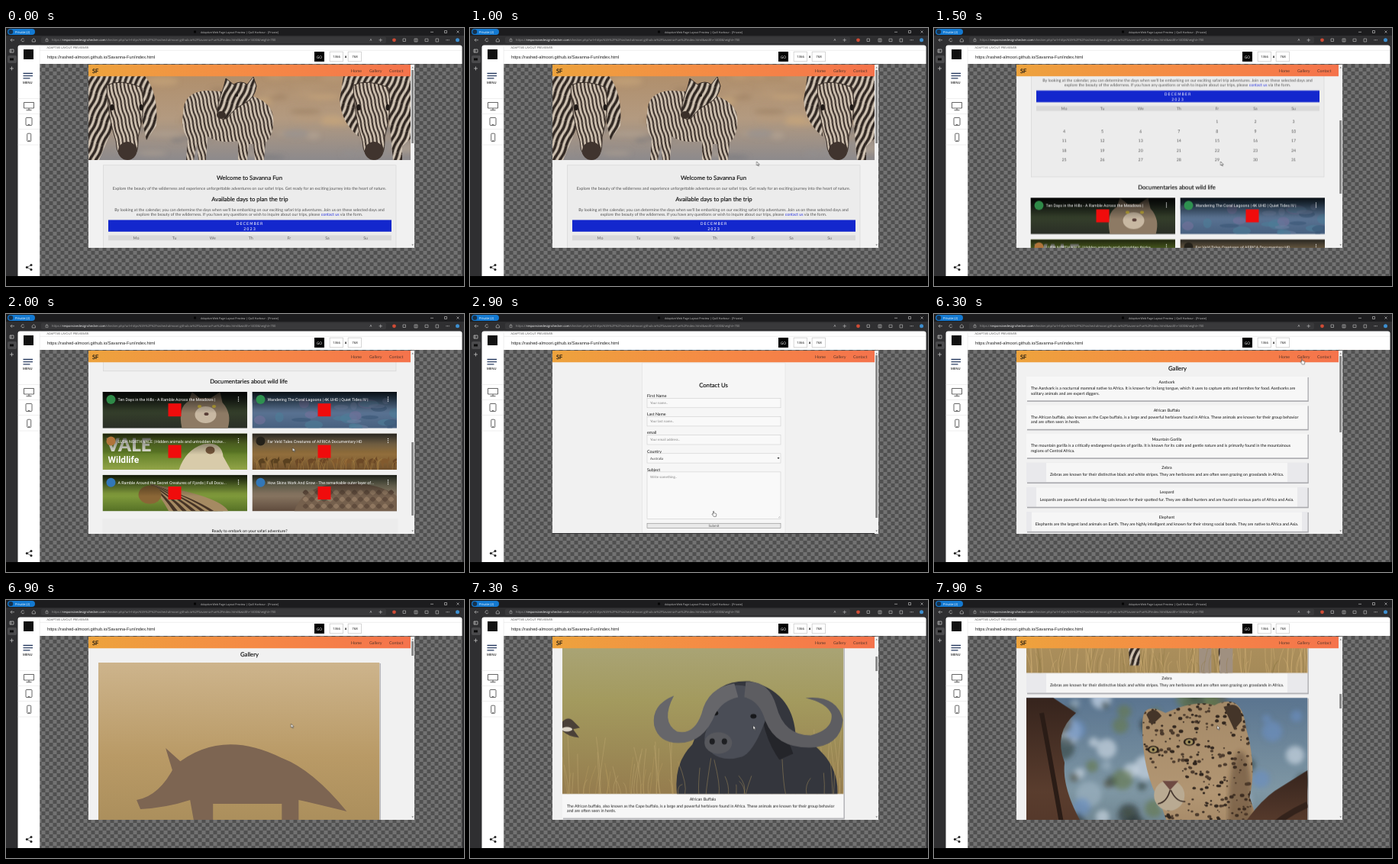
Recreate the animation shown at these times as an HTML page. Size 600 px wide and 338 px high, loop 8000 ms.

```html
<!DOCTYPE html>
<html lang="en">
<head>
<meta charset="utf-8">
<title>Site walkthrough</title>
<style>
html, body { margin: 0; width: 100%; height: 100%; overflow: hidden; background: #000; }
#stage { display: block; width: 100vw; height: 100vh; }
text { font: 5.3px Lato, "Open Sans", sans-serif; fill: #111; text-rendering: geometricPrecision; white-space: pre; }
.ui { font-family: "Open Sans", "Noto Sans", sans-serif; }
.mid { text-anchor: middle; }
.head { font-size: 7.75px; stroke: #111; stroke-width: .15px; }
.soft { fill: #505050; }
.link { fill: #54362b; }
.hint { font-size: 4.5px; fill: #858585; }
.clip { font: 5.3px Roboto, sans-serif; fill: #fff; }
.cal { font: 5px "DejaVu Sans", sans-serif; fill: #fff; letter-spacing: .95px; }
.thumb { fill: #858585; }

.home, .contact, .gallery, .bare, .full, .mouse, .arrow, .hand { animation: 8s step-end infinite; }
.home { animation-name: home; }
.contact { animation-name: contact; }
.gallery { animation-name: gallery; }
.bare { animation-name: bare; }
.full { animation-name: full; }
.mouse { animation-name: enter; }
.arrow { animation-name: arrow; }
.hand { animation-name: hand; }
@keyframes home { 0% { opacity: 1 } 35%, 100% { opacity: 0 } }
@keyframes contact { 0% { opacity: 0 } 35% { opacity: 1 } 69.4%, 100% { opacity: 0 } }
@keyframes gallery { 0% { opacity: 0 } 69.4%, 100% { opacity: 1 } }
@keyframes bare { 0% { opacity: 1 } 82%, 100% { opacity: 0 } }
@keyframes full { 0% { opacity: 0 } 82%, 100% { opacity: 1 } }
@keyframes enter { 0% { opacity: 0 } 5%, 100% { opacity: 1 } }
@keyframes arrow { 0% { opacity: 1 } 32% { opacity: 0 } 36.5% { opacity: 1 } 49% { opacity: 0 } 54% { opacity: 1 } 65% { opacity: 0 } 81%, 100% { opacity: 1 } }
@keyframes hand { 0% { opacity: 0 } 32% { opacity: 1 } 36.5% { opacity: 0 } 49% { opacity: 1 } 54% { opacity: 0 } 65% { opacity: 1 } 81%, 100% { opacity: 0 } }

.homeRoll { animation: homeRoll 8s linear infinite; }
.homeThumb { animation: homeThumb 8s linear infinite; }
.formRoll { animation: formRoll 8s linear infinite; }
.formThumb { animation: formThumb 8s linear infinite; }
.pics { animation: pics 8s linear infinite; }
.picsThumb { animation: picsThumb 8s linear infinite; }
.path { animation: path 8s ease-in-out infinite; }
@keyframes homeRoll { 0%, 13.5% { transform: translateY(0) } 22.5%, 27.5% { transform: translateY(-290px) } 31.2%, 100% { transform: translateY(-332px) } }
@keyframes homeThumb { 0%, 13.5% { transform: translateY(0) } 22.5%, 27.5% { transform: translateY(113px) } 31.2%, 100% { transform: translateY(129px) } }
@keyframes formRoll { 0%, 42% { transform: translateY(0) } 45%, 100% { transform: translateY(-13px) } }
@keyframes formThumb { 0%, 42% { transform: translateY(0) } 45%, 100% { transform: translateY(13px) } }
@keyframes pics { 0%, 87.6% { transform: translateY(0) } 91.25% { transform: translateY(-354px) } 98.75% { transform: translateY(-1077.5px) } 100% { transform: translateY(-1198px) } }
@keyframes picsThumb { 0%, 87.6% { transform: translateY(0) } 91.25% { transform: translateY(20px) } 98.75% { transform: translateY(69px) } 100% { transform: translateY(77px) } }
@keyframes path {
  0%, 5% { transform: translate(450px, 282px) }
  11%, 28% { transform: translate(375.5px, 175px) }
  32%, 36.5% { transform: translate(319px, 258px) }
  43% { transform: translate(345px, 215px) }
  50%, 53.5% { transform: translate(323px, 253px) }
  57.5% { transform: translate(388px, 176px) }
  66%, 80% { transform: translate(482px, 58.5px) }
  87%, 100% { transform: translate(371px, 164.5px) }
}
</style>
</head>
<body>
<svg id="stage" viewBox="0 0 600 338">
  <defs id="defs">
    <pattern id="checks" x="46.5" y="47" width="10" height="10" patternUnits="userSpaceOnUse">
      <path fill="#727272" d="M0 0h10v10H0z"/><path fill="#505050" d="M0 0h5v5H0zM5 5h5v5H5z"/>
    </pattern>
    <pattern id="stripes" width="7" height="30" patternUnits="userSpaceOnUse" patternTransform="rotate(24)">
      <path fill="#cfc2b2" d="M0 0h7v30H0z"/><path d="M3 0Q5 8 3.5 15T3 30" fill="none" stroke="#302722" stroke-width="3.6"/>
    </pattern>
    <pattern id="stripes2" width="5" height="24" patternUnits="userSpaceOnUse" patternTransform="rotate(-14)">
      <path fill="#d3c5b4" d="M0 0h5v24H0z"/><path d="M2 0Q3.5 6 2.5 12T2 24" fill="none" stroke="#3a2f29" stroke-width="2.2"/>
    </pattern>
    <clipPath id="view"><path d="M108 48h422v240H108z"/></clipPath>
    <clipPath id="banner"><path d="M108 63h422v110H108z"/></clipPath>
    <filter id="blur"><feGaussianBlur stdDeviation="3"/></filter>
  </defs>

  <!-- browser -->
  <path fill="#1c1c1e" d="M0 0h600v10H0z"/>
  <path fill="#2f2f31" d="M0 10h600v13H0zM0 22h18v303H0z"/>
  <rect x="2" y="1" width="36" height="8" rx="4" fill="#1379d1"/>
  <circle cx="6.3" cy="5" r="3" fill="#17324c"/>
  <text class="ui" x="12" y="6.6" style="font-size:4.1px;fill:#fff">Private (2)</text>
  <path fill="#050505" d="M246 3.5h3v3h-3z"/>
  <text class="ui mid" x="306" y="6.7" style="font-size:3.6px;fill:#c9c9c9">Adaptive Web Page Layout Preview | Quill Harbour - [Private]</text>
  <path d="M556 5.3h4M574.5 3.5h3v3h-3zM590.5 3.5l3 3m0-3l-3 3M11 15.8H6m2-2l-2 2 2 2M23.6 14.6a2 2 0 1 0 .3 1.8M34.2 18v-2.4l2.1-1.9 2.1 1.9V18z" fill="none" stroke="#d0d0d0" stroke-width=".6"/>
  <rect x="46" y="11.5" width="452" height="8.6" rx="2" fill="#39393b"/>
  <path d="M52 15h3v2.6h-3zM52.7 15v-1q.8-1 1.6 0v1" fill="none" stroke="#bbb" stroke-width=".5"/>
  <text class="ui" x="60" y="17.3" style="font-size:4.05px;fill:#a5a5a5">https://<tspan fill="#fff">responsivedesignchecker.com</tspan>/checker.php?url=https%3A%2F%2Frashed-almoori.github.io%2FSavanna-Fun%2Findex.html&amp;width=1400&amp;height=700</text>
  <text class="ui" x="476.5" y="17.4" style="font-size:4.4px;fill:#ccc">A</text>
  <g fill="none" stroke="#c4c4c4" stroke-width=".6">
    <path d="M488.5 15.8h4.4m-2.2-2.2v4.4M520 14h3.5v3.5H520zM535 14h4v4h-4zm2 0v4M549 14.2h4v3.4h-4zM563 14h3.6v4H563z"/>
  </g>
  <circle cx="508.5" cy="15.8" r="2.4" fill="#cf4b35"/>
  <path d="M576.5 15.8h4.2" stroke="#ccc" stroke-width=".9" stroke-dasharray=".9 .75"/>
  <circle cx="591.5" cy="15.8" r="2.5" fill="#3d8fd0"/>
  <rect x="2" y="36" width="12" height="10" rx="2" fill="#4a4a4c"/>
  <path d="M5 28h5v4H5zm1.7 0v4M7.5 50.5v5M5 53h5" fill="none" stroke="#ccc" stroke-width=".7"/>
  <path fill="#0c0c0c" d="M5 39.5h5v3H5z"/>

  <!-- checker site -->
  <path fill="#2f2f31" d="M590 22h10v303h-10z"/>
  <path fill="#fff" d="M15.5 25.4q0-3 3-3h576q3 0 3 3V47H44v278H15.5z"/>
  <path fill="url(#checks)" d="M44 47h553.5v278H44z"/>
  <path d="M44.2 22.5V325M15.5 92.5H44M15.5 112.5H44M15.5 132.5H44M15.5 153H44M44 29.3h553" stroke="#dfdfdf" stroke-width=".5"/>
  <path fill="#111" d="M23 28h13v13H23z"/>
  <path d="M22.5 59.5h12.5M22.5 62.7h12.5M22.5 65.9h9" stroke="#2c3f63" stroke-width="1.3"/>
  <text class="ui mid" x="28.3" y="73" style="font-size:4.2px;font-weight:600;fill:#222">MENU</text>
  <g fill="none" stroke="#333" stroke-width=".75">
    <path d="M23.5 97.5h13v7.5h-13zM30 105v2.5M26.5 107.6h7"/>
    <rect x="26" y="117.5" width="8" height="10" rx="1"/><rect x="27.7" y="138.2" width="5" height="10.4" rx="1"/>
    <path d="M33 310.5l-5.5 3 5.5 3"/>
    <path d="M29 126.4h2M29.3 147.4h2"/>
  </g>
  <g fill="#222"><circle cx="33" cy="310.4" r="1.5"/><circle cx="27.3" cy="313.5" r="1.5"/><circle cx="33" cy="316.6" r="1.5"/></g>
  <text class="ui" x="53.5" y="27.1" style="font-size:3.9px;fill:#555">ADAPTIVE LAYOUT PREVIEWER</text>
  <text x="54" y="39.6" style="font-family:'Liberation Sans',Arial,sans-serif;font-size:5.7px;fill:#222">https://rashed-almoori.github.io/Savanna-Fun/index.html</text>
  <path fill="#000" d="M404 31h13v13h-13z"/>
  <text class="ui mid" x="410.5" y="39.5" style="font-size:5px;fill:#fff">GO</text>
  <path d="M424.2 31.2h17.3v12.6h-17.3zM448.2 31.2h17.3v12.6h-17.3z" fill="#fff" stroke="#aaa" stroke-width=".5"/>
  <g class="mid"><text class="ui" x="433" y="39.2" style="font-size:4.3px">1366</text><text class="ui" x="445" y="39.2" style="font-size:4.6px;font-weight:700">x</text><text class="ui" x="457" y="39.2" style="font-size:4.3px">768</text></g>

  <!-- previewed pages -->
  <path fill="#f1f1f1" d="M108 48h427v240H108z"/>
  <g class="home">
    <g clip-path="url(#view)"><g class="homeRoll" id="homePage"></g></g>
    <rect class="thumb homeThumb" x="531.2" y="55" width="2.8" height="96"/>
  </g>
  <g class="contact">
    <g clip-path="url(#view)"><g class="formRoll" id="formPage"></g></g>
    <rect class="thumb formThumb" x="531.2" y="54" width="2.8" height="213"/>
  </g>
  <g class="gallery">
    <g class="bare">
      <g clip-path="url(#view)" id="bareCards"></g>
      <rect class="thumb" x="531.2" y="55" width="2.8" height="100"/>
    </g>
    <g class="full">
      <g clip-path="url(#view)"><g class="pics" id="fullCards"></g></g>
      <rect class="thumb picsThumb" x="531.2" y="54" width="2.8" height="19"/>
    </g>
  </g>
  <path d="M531.4 52.5l1.3-1.6 1.3 1.6zM531.4 283.5l1.3 1.6 1.3-1.6z" fill="#666"/>
  <path fill="url(#nav)" d="M108 48h422v15.3H108z"/>
  <text x="113" y="58.6" style="font-size:7.5px;stroke:#111;stroke-width:.15px">SF</text>
  <text class="link" x="452" y="57.6">Home</text><text class="link" x="476" y="57.6">Gallery</text><text class="link" x="502" y="57.6">Contact</text>

  <g class="mouse"><g class="path" fill="#fff" stroke="#222" stroke-width=".5">
    <path class="arrow" d="M0 0v5l1.2-1 .9 1.9 .9-.4-.9-1.8h1.6z"/>
    <path class="hand" d="M-.5.6q.6-.9 1.1 0v2.2l2.6.6q.8.3.6 1.4l-.5 2.5H.2L-1.9 4.4q0-.9.9-.5l.5.5z"/>
  </g></g>
</svg>
<script>
const $ = id => document.getElementById(id);
const text = (x, y, str, cls = '', style = '') => `<text x="${x}" y="${y}" class="${cls}" style="${style}">${str}</text>`;
const box = (x, y, w, h, fill, more = '') => `<rect x="${x}" y="${y}" width="${w}" height="${h}" fill="${fill}" ${more}/>`;
const shape = (d, fill, more = '') => `<path d="${d}" fill="${fill}" ${more}/>`;
const oval = (x, y, rx, ry, fill, more = '') => `<ellipse cx="${x}" cy="${y}" rx="${rx}" ry="${ry}" fill="${fill}" ${more}/>`;
const range = n => [...Array(n).keys()];
let seed = 7;
const rnd = (a = 0, b = 1) => a + (b - a) * (seed = seed * 16807 % 2147483647) / 2147483647;
const pick = list => list[Math.floor(rnd(0, list.length))];

const grads = {
  nav: ['#eda33d', '#f58a45', '#f5734c'], shade: ['#000c', '#0005', '#0000'],
  plain: ['#b08f6c', '#b39a80', '#8d8a8c'], forest: ['#151a17', '#35402b', '#2a2e26'],
  sea: ['#31506b', '#5c7595', '#47607f'], leaf: ['#87a23a', '#5f7d27', '#93a548'],
  veld: ['#b7a88c', '#98743f', '#6f4f2b'], moss: ['#5d7a2c', '#86a13e', '#557026'],
  rock: ['#8e9a78', '#8d7b66', '#5e4a3c'], olive: ['#aeab86', '#a39a5e', '#957c4e'],
  sand: ['#cdb48c', '#b99a66', '#a58a58'], sky: ['#5a748f', '#7f97a4', '#4f626a'],
  jungle: ['#5f7a44', '#46602f', '#33451f'], coat: ['#a58a68', '#b29673', '#927454'],
  bark: ['#36241d', '#5a3d2e', '#4a2f24'],
};
$('defs').innerHTML += Object.entries(grads).map(([id, colors]) =>
  `<linearGradient id="${id}" ${id === 'nav' ? '' : 'x2="0" y2="1"'}>` +
  colors.map((c, i) => `<stop offset="${i / 2}" stop-color="${c}"/>`).join('') + '</linearGradient>').join('');

const footer = y => box(108, y, 422, 15, '#2d2d2f') +
  [305, 319.5, 333.5].map(x => oval(x, y + 7.2, 3.6, 3.6, '#5a70e0')).join('');

// home
const grazing = shape('M132 75Q150 66 178 78Q183 110 173 143Q174 172 160 172Q145 172 144 148Q133 115 132 75Z', 'url(#stripes2)', 'stroke="#3a2f29"') +
  oval(159, 161, 12, 12, '#40342e') + oval(139, 104, 2.5, 4, '#1f1916') + oval(177, 104, 2.5, 4, '#1f1916');
const haze = range(50).map(() => {
  const y = rnd(63, 173);
  return oval(rnd(108, 530), y, rnd(8, 24), rnd(2, 6), pick(y < 125 ? ['#c8a67c', '#9c7f60', '#b79a78'] : ['#77777c', '#b5a594', '#93908f']), 'opacity=".6"');
}).join('');
const hero = `<g clip-path="url(#banner)">` + box(108, 63, 422, 110, 'url(#plain)') + `<g filter="url(#blur)">${haze}</g>` +
  shape('M108 63H182Q200 85 197 128L184 147L178 120 140 130 122 173H108Z', 'url(#stripes)') + grazing +
  shape('M232 112Q232 84 262 82L300 84Q345 90 350 115Q352 140 340 150L338 173H326L324 152H318L316 173H304V148Q280 152 264 142L262 173H252L250 150 246 173H236L238 145Q228 130 232 112Z', 'url(#stripes2)') +
  shape('M285 78L288 66 298 74Q308 68 316 74L324 64 328 76Q326 92 312 99Q298 106 290 118Q282 122 277 114Q276 100 285 78Z', 'url(#stripes)', 'stroke="#3a2f29"') +
  oval(282, 114, 6, 5, '#3a2f29') + oval(302, 88, 2, 2, '#1f1916') +
  shape('M442 63H530V145L519 155V173H507L502 120 460 115 462 142Q440 125 437 95Z', 'url(#stripes)') +
  `<g transform="translate(323)">${grazing}</g></g>`;

const calendar = box(134, 251.5, 371, 15.3, '#1327cd') +
  text(319.5, 257.6, 'DECEMBER', 'cal mid') + text(319.5, 265, '2023', 'cal mid') +
  box(134, 271.5, 371, 6.8, '#d9d9d9') +
  ['Mo', 'Tu', 'We', 'Th', 'Fr', 'Sa', 'Su'].map((d, i) => text(170.5 + i * 50.1, 276.8, d, 'mid', 'fill:#666')).join('') +
  range(31).map(n => text(170.5 + (n + 4) % 7 * 50.1, 294 + Math.floor((n + 4) / 7) * 12.5, n + 1, 'mid', 'fill:#555')).join('');

const blades = (n, w, h, color, tall = .35) => range(n).map(() => {
  const x = rnd(0, w);
  return `<path d="M${x} ${h}q${rnd(-4, 4)} -12 ${rnd(-9, 9)} ${-rnd(12, h * tall)}" fill="none" stroke="${color}" stroke-width=".7" opacity=".6"/>`;
}).join('');

const videos = [
  ['Ten Days in the Hills - A Ramble Across the Meadows |', '#2f8a48', 'forest',
    shape('M104 48Q98 20 113 12L117 0L127 8H142L154 0L157 14Q170 28 164 48Z', '#8d7a64') +
    oval(135, 30, 14, 11, '#c8b8a2') + oval(127, 19, 2.6, 2, '#c9b13c') + oval(146, 19, 2.6, 2, '#c9b13c') + oval(136, 29, 3, 2, '#5a3f38')],
  ['Wandering The Coral Lagoons | 4K UHD | Quiet Tides IV |', '#2e9150', 'sea',
    range(26).map(() => oval(rnd(0, 190), rnd(12, 48), rnd(3, 14), rnd(2, 7), pick(['#6d7fa0', '#3b5877', '#75729b', '#4e7d98']), 'opacity=".6"')).join('')],
  ['LUSH NORTH VALE | Hidden animals and untrodden thicke...', '#b0743a', 'leaf',
    shape('M100 48Q108 22 132 14Q156 10 158 30L168 48Z', '#d8cbaa') + oval(141, 22, 6, 5, '#77583c') +
    text(5, 24, 'VALE', '', 'font:900 24px Lato,sans-serif;fill:#eef0e2') + text(7, 39, 'Wildlife', '', 'font:700 12px Roboto,sans-serif;fill:#fff')],
  ['Far Veld Tales Creatures of AFRICA Documentary HD', '#24211a', 'veld',
    range(12).map(i => shape(`M${8 + i * 16} 36q4-5 9-2l2-4 1 5-2 2v8h-1v-6h-5v6h-1z`, pick(['#6b4826', '#825a2e', '#59401f']))).join('') + blades(40, 190, 48, '#b08746')],
  ['A Ramble Around the Secret Creatures of Fjords | Full Docu...', '#3277b8', 'moss',
    range(11).map(i => shape(`M62 12Q${85 + i * 7} ${18 + i} ${95 + i * 7} 48H${87 + i * 6}Q${76 + i * 4} 28 62 12Z`, i % 2 ? '#463426' : '#a58a62')).join('') + oval(62, 26, 15, 12, '#8a6636')],
  ['How Skins Work And Grow - The remarkable outer layer of...', '#3277b8', 'rock',
    shape('M55 48Q65 18 105 12Q160 6 190 28V48Z', '#75604d') +
    range(45).map(i => shape(`M${66 + i % 15 * 8} ${23 + Math.floor(i / 15) * 9}q4-7 8 0q-4 7-8 0z`, i % 2 ? '#8f7760' : '#604c3d')).join('')],
];
const video = ([title, badge, bg, art], i) =>
  `<svg x="${i % 2 ? 322.5 : 126.5}" y="${392 + Math.floor(i / 2) * 54.4}" width="189.5" height="47.5">` +
  box(0, 0, 190, 48, `url(#${bg})`) + art + box(0, 0, 190, 28, 'url(#shade)') +
  oval(11, 10, 6, 6, badge) + text(20, 12.2, title, 'clip') +
  [7, 9.5, 12].map(y => oval(178, y, .7, .7, '#fff')).join('') +
  box(86, 15.2, 17, 17, '#f00c0c') + '</svg>';

$('homePage').innerHTML = box(108, 48, 422, 580, '#f1f1f1') + hero +
  box(127.5, 179.8, 383.5, 185, '#ececec', 'stroke="#d3d3d3" stroke-width=".6"') +
  text(319, 199.3, 'Welcome to Savanna Fun', 'head mid') +
  text(319, 212, 'Explore the beauty of the wilderness and experience unforgettable adventures on our safari trips. Get ready for an exciting journey into the heart of nature.', 'mid soft') +
  text(319.5, 226.8, 'Available days to plan the trip', 'head mid') +
  text(319, 239.5, 'By looking at the calendar, you can determine the days when we\'ll be embarking on our exciting safari trip adventures. Join us on these selected days and', 'mid soft') +
  text(319, 245.6, 'explore the beauty of the wilderness. If you have any questions or wish to inquire about our trips, please <tspan fill="#2430dd">contact us</tspan> via the form.', 'mid soft') +
  calendar + text(318, 380.8, 'Documentaries about wild life', 'head mid') + videos.map(video).join('') +
  box(126.5, 558, 387, 44, '#ececec') + text(319, 575.8, 'Ready to embark on your safari adventure?', 'mid') +
  box(300, 584, 38, 11, '#f58a45', 'rx="2"') + text(319, 591.4, 'Contact us', 'mid') + footer(605);

// contact form
const field = ([label, hint], i) => {
  const y = 110.5 + i * 24.1;
  return text(232, y - 1.3, label) + box(232, y, 175, i === 4 ? 61.5 : 12.3, '#f9f9f9', 'stroke="#c6c6c6" stroke-width=".5"') +
    text(236, y + 7.7, hint, 'hint', i === 3 ? 'fill:#444' : '');
};
$('formPage').innerHTML = box(108, 48, 422, 260, '#f1f1f1') +
  box(225.5, 64, 187.5, 223, '#f6f6f6', 'stroke="#e0e0e0" stroke-width=".6"') + text(319, 96.2, 'Contact Us', 'head mid') +
  [['First Name', 'Your name..'], ['Last Name', 'Your last name..'], ['email', 'Your email address..'], ['Country', 'Australia'], ['Subject', 'Write something..']].map(field).join('') +
  shape('M402.5 188l1.5 2 1.5-2z', '#222') + shape('M404 267l2-2M405 267.5l1.3-1.3', 'none', 'stroke="#888" stroke-width=".4"') +
  box(232, 274.2, 175, 6.5, '#e9e9e9', 'stroke="#777" stroke-width=".5"') +
  text(319.5, 279, 'Submit', 'mid', 'font-size:4.5px;fill:#555') + footer(287);

// gallery
const head = 'M152 32Q152 4 182 20Q222 2 246 10Q282 -8 287 38Q302 90 292 130L330 245H212Q190 180 176 140Q150 95 152 32Z';
$('defs').innerHTML += `<clipPath id="fur"><path d="${head}"/></clipPath>`;
const bokeh = range(120).map(() => {
  const r = rnd(5, 17);
  return oval(rnd(30, 368), rnd(0, 245), r, r, pick(['#cfdbe6', '#6a8fc0', '#66794f', '#374544', '#9db2c2', '#2f3a3a', '#57574a']), 'opacity=".65"');
}).join('');
const spots = range(620).map(() => {
  const x = rnd(150, 330), y = rnd(5, 245), r = rnd(1, 3);
  return Math.hypot(x - 188, y - 118) < 26 ? '' : oval(x, y, r, r * .75, pick(['#30251d', '#4b3a2c']));
}).join('');
const eye = (x, y) => oval(x, y, 7.5, 5, '#2b211a') + oval(x, y, 5, 3.8, '#a08f5c') + oval(x, y, 1.7, 1.7, '#111');

const leopard = box(0, 0, 368, 245, 'url(#sky)') + `<g filter="url(#blur)">${bokeh}</g>` +
  shape('M0 0H35L65 20Q35 45 50 85Q45 130 95 200L100 245H0Z', 'url(#bark)') + shape('M20 20Q35 100 60 245', 'none', 'stroke="#2a1c16" stroke-width="6"') +
  shape(head, 'url(#coat)') + `<g clip-path="url(#fur)">${spots}<g filter="url(#blur)">${oval(280, 150, 16, 80, '#4a3526', 'opacity=".45"')}</g></g>` +
  oval(187, 128, 20, 20, '#b9aa92') + shape('M178 109H199L188 121Z', '#6e4a42') + shape('M188 121Q184 137 172 139M189 121Q196 137 208 136', 'none', 'stroke="#3a2c25" stroke-width="1.6"') +
  eye(166, 68) + eye(213, 58) + shape('M157 22q10-13 20 2l-13 12zM258 12q24-10 24 18l-10 12z', '#443529') +
  shape('M240 245Q285 150 325 122L368 95V245Z', 'url(#bark)') + shape('M262 245Q300 170 368 140', 'none', 'stroke="#33221b" stroke-width="8"');

const buffalo = box(0, 0, 368, 245, 'url(#olive)') + blades(60, 368, 245, '#c2aa74') +
  shape('M150 245Q145 205 170 180L190 130Q200 95 245 97Q300 110 305 165Q362 195 360 245Z', '#34363d') +
  shape('M262 148Q292 160 302 192L284 200Q268 178 262 148Z', '#24252a') +
  shape('M195 120Q215 95 245 105Q275 115 265 150Q250 190 235 196Q205 205 190 185Q180 170 195 150Z', '#4a4d56') +
  oval(204, 178, 18, 14, '#57585d') + oval(196, 176, 3.5, 4, '#1e1f22') + oval(212, 176, 3.5, 4, '#1e1f22') +
  oval(200, 139, 4, 3, '#17181b') + oval(250, 143, 4, 3, '#17181b') +
  shape('M225 100Q190 105 182 140Q172 168 150 163Q128 150 146 116Q116 128 120 155Q126 178 152 178Q185 178 200 140Q210 122 230 118Z', '#66666a') +
  shape('M240 98Q270 95 280 130Q290 168 325 168Q355 160 352 140Q345 125 318 119Q360 115 367 148Q364 182 325 184Q280 185 266 150Q258 122 238 118Z', '#5d5d61') +
  shape('M0 150Q8 142 15 150L23 158 14 160 22 171Q8 170 0 162Z', '#4a4038') + oval(6, 160, 7, 3, '#ddd5c8') + blades(30, 368, 245, '#b79c62', .2);

const zebra = box(0, 0, 368, 245, 'url(#sand)') + blades(90, 368, 245, '#d8b87c') +
  shape('M110 70Q95 45 70 60L62 90 95 105 125 110Q120 150 132 180L135 235H148L150 180H225L228 245H240L243 190H250L253 245H266L270 150Q280 95 240 85Q180 80 150 85Z', 'url(#stripes)') +
  shape('M226 212H242V245H226zM253 212H270V245H253z', '#a09080') + blades(40, 368, 245, '#8f7a44', .15);

const gorilla = box(0, 0, 368, 245, 'url(#jungle)') +
  shape('M90 245Q90 130 145 100Q150 45 185 42Q222 45 228 100Q285 130 285 245Z', '#25272a') + oval(187, 92, 24, 28, '#3a3a3c');
const aardvark = box(0, 0, 368, 245, 'url(#sand)') +
  shape('M50 180Q80 175 100 135Q160 85 240 125Q280 140 325 195Q285 185 262 180V225H240V185H150V225H128L120 180Q90 190 55 192Z', '#7d6552') + shape('M98 145L88 112 108 130Z', '#7d6552');
const elephant = box(0, 0, 368, 245, 'url(#veld)') +
  shape('M105 235V130Q80 150 88 220H75Q65 120 110 85Q170 45 250 75Q290 95 285 235H250V180H160V235Z', '#77726d') + oval(150, 115, 30, 40, '#67625e');

const animals = [
  ['Aardvark', aardvark, 0, 'The Aardvark is a nocturnal mammal native to Africa. It is known for its long tongue, which it uses to capture ants and termites for food. Aardvarks are', 'solitary animals and are expert diggers.'],
  ['African Buffalo', buffalo, 0, 'The African buffalo, also known as the Cape buffalo, is a large and powerful herbivore found in Africa. These animals are known for their group behavior', 'and are often seen in herds.'],
  ['Mountain Gorilla', gorilla, 0, 'The mountain gorilla is a critically endangered species of gorilla. It is known for its calm and gentle nature and is primarily found in the mountainous', 'regions of Central Africa.'],
  ['Zebra', zebra, 316, 'Zebras are known for their distinctive black and white stripes. They are herbivores and are often seen grazing on grasslands in Africa.'],
  ['Leopard', leopard, 342, 'Leopards are powerful and elusive big cats known for their spotted fur. They are skilled hunters and are found in various parts of Africa and Asia.'],
  ['Elephant', elephant, 354, 'Elephants are the largest land animals on Earth. They are highly intelligent and known for their strong social bonds. They are native to Africa and Asia.'],
];
const cards = picHeight => {
  let top = 82;
  return box(108, 48, 422, 2000, '#f1f1f1') + text(319, 74, 'Gallery', 'head mid') + animals.map(([name, art, inner, line1, line2]) => {
    const h = picHeight + (line2 ? 31.3 : 26), y = top + picHeight;
    let out = box(122, top + 1, 368.8, h + .6, '#a9a9ad') + box(121, top, 368.5, h, line2 ? '#f7f7f7' : '#e9e9ec');
    if (picHeight) out += `<svg x="121" y="${top}" width="368.5" height="245" viewBox="0 0 368 245" preserveAspectRatio="none">${art}</svg>`;
    if (!line2) out += box(305 - inner / 2, y + .5, inner, 25, '#f6f6f6');
    out += text(305, y + 8.6, name, 'mid');
    out += line2 ? text(127, y + 17.4, line1) + text(127, y + 23.6, line2) : text(305, y + 17.8, line1, 'mid');
    top += h + 6.2;
    return out;
  }).join('');
};
$('bareCards').innerHTML = cards(0);
$('fullCards').innerHTML = cards(245);
</script>
</body>
</html>
```
